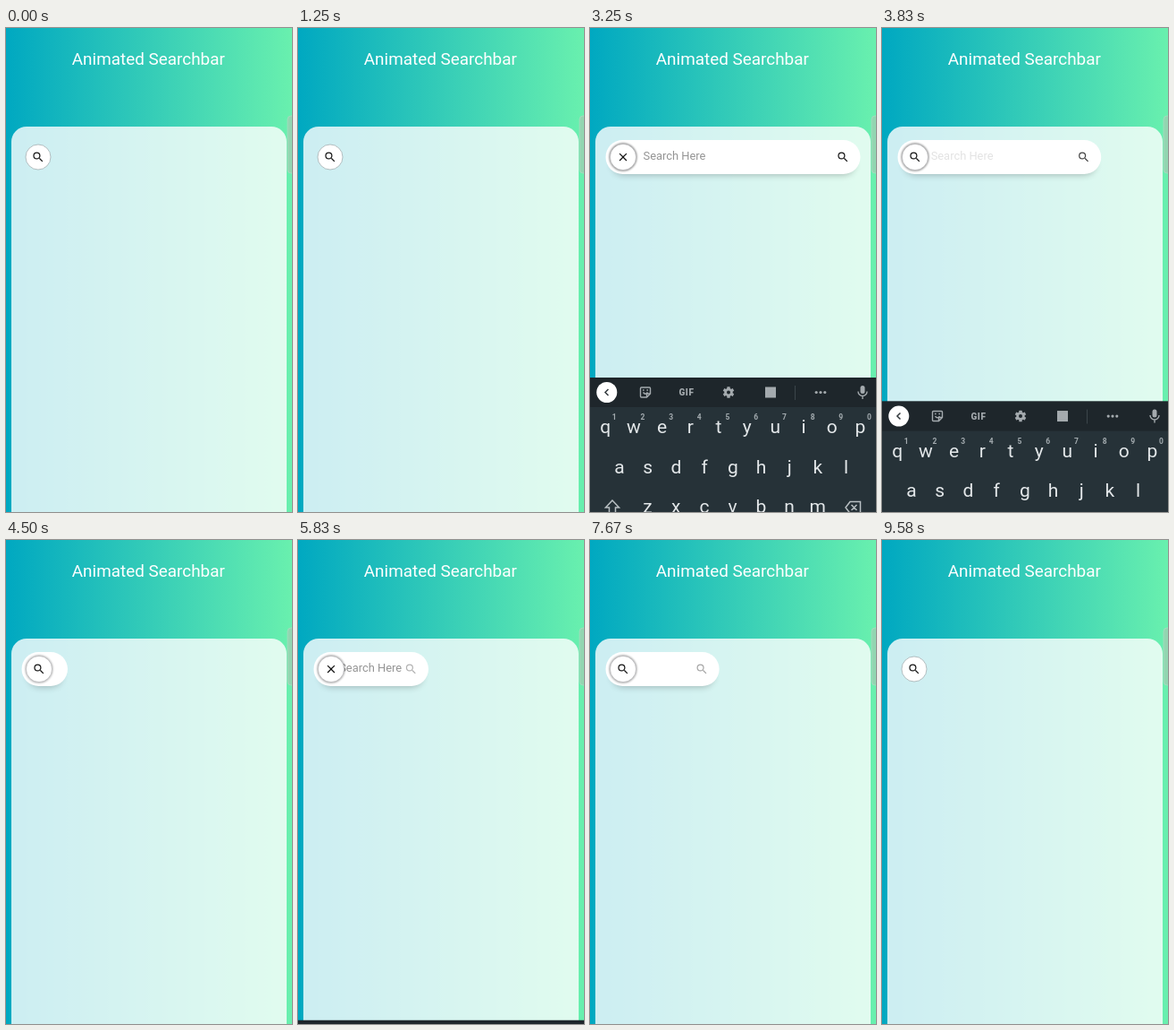
Animation, 320 px wide and 540 px high, one loop 9.66 s. Source, as an HTML page:

```html
<!DOCTYPE html>
<html lang="en">
<head>
<meta charset="utf-8">
<title>Animated Searchbar</title>
<style>
  html, body { margin: 0; width: 100%; height: 100%; overflow: hidden; }
  svg { display: block; width: 100%; height: 100%; font-family: Roboto, sans-serif; }
  #keys text { text-anchor: middle; fill: #e3e7e9; font-size: 21px; }
  #keys .digit { fill: #a3abaf; font-size: 8.5px; font-weight: 700; }
  .tool { fill: #a4aaae; }
  .line { fill: none; stroke: #a4aaae; stroke-width: 1.4; }
</style>
</head>
<body>
<svg viewBox="0 0 320 540" preserveAspectRatio="none">
  <defs>
    <linearGradient id="sky">
      <stop offset="0" stop-color="#00a8c1"/>
      <stop offset="1" stop-color="#69f0ae"/>
    </linearGradient>
    <filter id="soft" x="-50%" y="-100%" width="200%" height="300%">
      <feGaussianBlur stdDeviation="4"/>
    </filter>
    <filter id="halo" x="-30%" y="-30%" width="160%" height="160%">
      <feGaussianBlur stdDeviation="1.3"/>
    </filter>
    <path id="search" d="M15.5 14h-.79l-.28-.27A6.47 6.47 0 0 0 16 9.5 6.5 6.5 0 1 0 9.5 16c1.61 0 3.09-.59 4.23-1.57l.27.28v.79l5 4.99L20.49 19zm-6 0a4.5 4.5 0 1 1 0-9 4.5 4.5 0 0 1 0 9z"/>
    <path id="close" d="M19 6.41 17.59 5 12 10.59 6.41 5 5 6.41 10.59 12 5 17.59 6.41 19 12 13.41 17.59 19 19 17.59 13.41 12z"/>
  </defs>

  <rect width="320" height="540" fill="url(#sky)"/>
  <text x="73.8" y="41" font-size="18.9" fill="#fff">Animated Searchbar</text>
  <rect x="6" y="110" width="308" height="460" rx="17" fill="#fff" fill-opacity=".8"/>
  <rect x="315" y="98" width="14" height="64" rx="4" fill="#9ccfb2" fill-opacity=".8" stroke="#a9dcc0" stroke-width=".8"/>

  <g id="bar">
    <rect id="shade" x="26" y="141" height="22" rx="11" opacity=".3" filter="url(#soft)"/>
    <rect id="pill" x="17.5" y="125" height="38" rx="19" fill="#fff"/>
    <g id="suffix"><use href="#search" transform="translate(-7.5 136.5) scale(.625)" fill="#151515"/></g>
    <g id="field">
      <text id="hint" y="147.3" font-size="12.9" fill="#949494">Search Here</text>
      <rect id="caret" x="-.4" y="137" width="1.6" height="13" rx=".8" fill="#222"/>
    </g>
  </g>
  <circle id="glow" cx="37" cy="144" r="15.4" filter="url(#halo)"/>
  <circle id="knob" cy="144" fill="#fff"/>
  <use id="icon" fill="#151515"/>

  <g id="board">
    <rect y="390" width="320" height="160" fill="#263238"/>
    <rect y="390" width="320" height="33" fill="#1e262b"/>
    <circle cx="18.8" cy="406.5" r="11.5" fill="#fff"/>
    <path d="M20.5 403 17 406.5l3.500 3.500" fill="none" stroke="#333a3e" stroke-width="1.5"/>
    <path class="line" d="M57.500 401h9a1 1 0 0 1 1 1v6l-4 4h-6a1 1 0 0 1-1-1v-9a1 1 0 0 1 1-1zM67.500 408h-4v4M59.500 406.500q2.500 3.500 5 0"/>
    <path class="tool" d="M59 403.200h1.600v1.600H59zM63.400 403.200H65v1.600h-1.600z"/>
    <text class="tool" x="108" y="410" font-size="10" font-weight="900" letter-spacing=".6" text-anchor="middle">GIF</text>
    <g id="gear" class="tool" transform="translate(155 406.500)"></g>
    <rect class="tool" x="196" y="400.500" width="12" height="12"/>
    <path d="M229.500 399v16" stroke="#3b454a"/>
    <g class="tool">
      <circle cx="253.200" cy="406.500" r="1.600"/><circle cx="258" cy="406.500" r="1.600"/><circle cx="262.800" cy="406.500" r="1.600"/>
      <rect x="302.500" y="399" width="5" height="9" rx="2.500"/>
    </g>
    <path class="line" d="M300 405.500a5 5 0 0 0 10 0M305 410.500v3.500"/>
    <g id="keys"></g>
    <path d="M25 527l-7.500 8h4v9h7v-9h4z" fill="none" stroke="#b9c0c3" stroke-width="1.500"/>
    <path d="M291 528.500h11.500v13H291l-5-6.500zM292.500 532l6 6m0-6-6 6" fill="none" stroke="#b9c0c3" stroke-width="1.500"/>
  </g>
</svg>
<script>
const NS = 'http://www.w3.org/2000/svg';
const LOOP = 9660, STEP = 1000 / 12, SPAN = 1000;
const SESSIONS = [[1673, 3686], [5592, 7208]]; // open and close times
const $ = id => document.getElementById(id);
const set = (id, attrs) => {
  for (const k in attrs) $(id).setAttribute(k, attrs[k]);
};
const clamp = x => Math.min(1, Math.max(0, x));

function add(parent, tag, attrs, text) {
  const el = document.createElementNS(NS, tag);
  for (const k in attrs) el.setAttribute(k, attrs[k]);
  if (text) el.textContent = text;
  $(parent).appendChild(el);
}

function bezier(x1, y1, x2, y2) {
  const at = (a, b, s) => 3 * a * s * (1 - s) ** 2 + 3 * b * s * s * (1 - s) + s ** 3;
  return x => {
    x = clamp(x);
    if (x === 0 || x === 1) return x;
    let lo = 0, hi = 1;
    for (let i = 0; i < 24; i++) {
      const mid = (lo + hi) / 2;
      if (at(x1, x2, mid) < x) lo = mid; else hi = mid;
    }
    return at(y1, y2, lo);
  };
}
const easeOut = bezier(0, 0, .58, 1);
const slideIn = bezier(.4, 0, .2, 1);
const slideOut = bezier(.4, 0, 1, 1);

function buildKeys() {
  [['qwertyuiop', 17.2, 452], ['asdfghjkl', 33, 496.5], ['zxcvbnm', 64.5, 541]].forEach(([row, x0, y], r) => {
    [...row].forEach((c, i) => {
      const x = x0 + i * 31.7;
      add('keys', 'text', { x, y }, c);
      if (!r) add('keys', 'text', { x: x + 10, y: 437, class: 'digit' }, String((i + 1) % 10));
    });
  });
  for (let a = 0; a < 360; a += 60)
    add('gear', 'rect', { x: -1.7, y: -6.3, width: 3.4, height: 4, rx: .5, transform: `rotate(${a})` });
  add('gear', 'circle', { r: 4.7 });
  add('gear', 'circle', { r: 2, fill: '#1e262b' });
}

function draw(time) {
  const t = Math.floor((time + 5) / STEP) * STEP;
  const [open, shut] = SESSIONS.find(s => t < s[1] + SPAN) || SESSIONS[1];
  const up = t - open, down = t - shut;
  const closing = down >= 0;
  const active = up >= 0 && down < SPAN;
  const typing = active && !closing;

  const fade = ms => closing ? 1 - clamp(down / ms) : clamp(up / ms);
  const p = closing ? 1 - easeOut(down / SPAN) : easeOut(up / SPAN);
  const width = 38 + 247 * p;

  set('bar', { visibility: active ? 'visible' : 'hidden' });
  set('pill', { width });
  set('shade', { width: width - 16 });
  set('suffix', { transform: `translate(${17.5 + width - 19.5} 0)`, opacity: fade(740) });
  set('field', { transform: `translate(${38.5 + 21 * p} 0)` });
  set('hint', { opacity: fade(200) });
  set('caret', { opacity: typing && up % 1000 < 500 ? 1 : 0 });

  const cx = active ? 37 : 36;
  set('glow', { opacity: active ? .3 + .2 * p : 0 });
  set('knob', {
    cx, r: active ? 14.6 : 14,
    stroke: active ? '#b9b9bb' : '#98a4a6',
    'stroke-width': active ? .8 : .7
  });
  set('icon', {
    href: typing ? '#close' : '#search',
    transform: `translate(${cx - 7.5} 136.500) scale(.625)`
  });

  const shown = closing ? 1 - slideOut((down - 60) / 250) : slideIn((up - 212) / 285);
  set('board', {
    transform: `translate(0 ${150 * (1 - shown)})`,
    visibility: shown > 0 ? 'visible' : 'hidden'
  });
}

buildKeys();
const start = performance.now();
function tick() {
  draw((performance.now() - start) % LOOP);
  requestAnimationFrame(tick);
}
tick();
</script>
</body>
</html>
```
